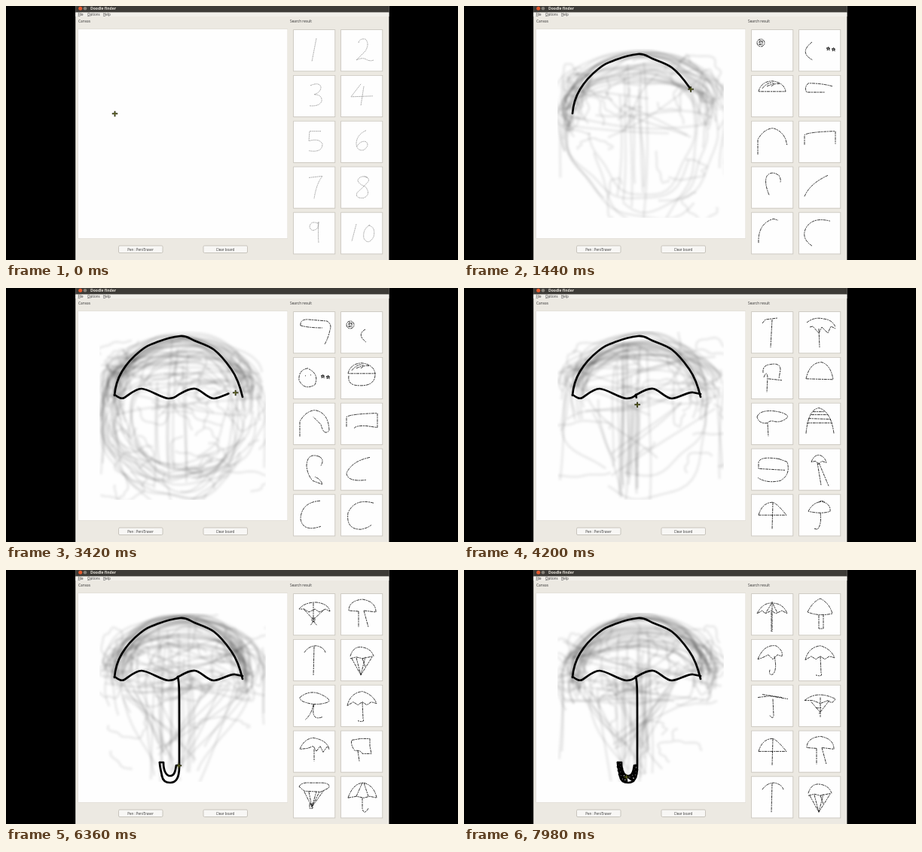
These frames come from a looping animation (600 by 338 pixels, 8000 ms). An HTML page with a canvas:

```html
<!DOCTYPE html>
<html lang="en">
<head>
<meta charset="utf-8">
<title>Doodle finder</title>
<style>
html, body { margin: 0; width: 600px; height: 338px; overflow: hidden; background: #000; }
canvas { display: block; }
svg { position: absolute; width: 0; height: 0; }
</style>
</head>
<body>
<canvas id="stage" width="600" height="338"></canvas>
<svg><path id="ruler"/></svg>
<script>
const LOOP = 8000, STEP = 60;
const ctx = stage.getContext('2d');

// Pen steps: path, start, end, ink, how far the ink trails the cursor (ms)
const steps = [
  ['M144 143C145 131 148 121 154 111S168 92 178 84S190 76 203 71S222 65 231 64S243 67 250 70S268 76 276 82S292 98 299 108S311 132 314 145', 60, 1680, 1, 10],
  ['M314 145L144 143', 1740, 1980, 0, 0],
  ['M144 142C150 146 153 148 157 146S171 134 180 134S207 147 216 147S227 143 229 142S243 133 251 134S267 147 276 147S296 138 304 139L314 141', 2020, 3500, 1, 75],
  ['M314 141L228 142', 3600, 4020, 0, 0],
  ['M228 142C230 150 230 160 230 190V262C230 277 225 283 218 283S208 280 207 274', 4136, 4936, 1, 45],
  ['M207 274C206 268 204 262 204 256', 4980, 5280, 1, 0],
  ['M204 256H209C209 266 212 274 218 274S225 266 226 260H229', 5460, 6180, 1, 0],
  ['M228 260L226 264 230 266 225 268 229 271 224 271 228 276 221 274 225 281 218 276', 6420, 6960, 1, 0],
  ['M218 276L205 257', 6960, 7080, 0, 0],
  ['M205 257L208 260 204 262 210 264 205 267 211 268 206 272 212 271 208 277 214 275 211 281 216 281 215 275', 7080, 7980, 1, 0]
].map(([d, from, to, ink, lag]) => {
  ruler.setAttribute('d', d);
  return { d, from, to, ink, lag, path: new Path2D(d), length: ruler.getTotalLength() };
});

// Thumbnail drawings, each in a 55 px square
const face = 'M7 17a5 5 0 1 0 10 0a5 5 0 1 0-10 0M9 16h2M12 15h2M9 19h5M11 13v8M14 14v6';
const stars = 'M36 24h5l-4 3 1.5-5 2 5zM43 25h5l-4 3 1.5-5 2 5z';
const bun = 'M9 21Q12 8 27 7Q43 9 45 21ZM14 17Q20 9 28 9M20 14L30 10M26 14Q32 9 37 11';
const tee = 'M23 23L10 22Q10 9 28 7Q46 10 46 24L30 22M23 23V44M30 22L36 44';
const cane = 'M14 17Q20 8 30 8Q40 10 42 17M27 9L26 48';
const chute = 'M12 22Q16 8 28 10Q40 12 43 22M12 25L20 23 28 25 42 22M14 25L26 47L41 23M20 24L26 47L32 23M28 25L32 36';
const brolly = 'M8 27Q12 10 28 8Q42 12 47 24L40 22 34 26 28 22 22 26 16 22ZM28 22L29 44Q32 50 22 47';
const tent = 'M9 27Q14 10 28 10Q34 12 46 27ZM28 10L27 46';

const digits = [
  'M30 11L24 42',
  'M23 17Q24 11 32 12Q38 18 32 28L20 40Q28 36 33 39T43 40',
  'M22 13Q34 8 36 15Q36 22 27 25Q38 25 37 34Q34 41 21 40',
  'M26 11L13 28L42 27M30 14L26 40',
  'M36 13L21 13L20 26Q34 22 38 30Q38 42 20 39',
  'M33 12Q20 18 20 30Q21 40 30 38Q38 32 33 27Q26 25 21 33',
  'M20 14L38 12Q30 22 27 42',
  'M35 14Q26 10 22 17Q22 22 32 26Q40 36 30 41Q18 42 21 34Q30 26 36 19Q38 14 30 12',
  'M32 14Q22 10 21 19Q24 27 32 20L33 12Q32 28 33 40',
  'M20 15L14 38M38 16Q28 22 30 34Q36 44 43 32Q46 18 36 17'
];
const arcs = [
  face,
  'M17 16Q-1 30 18 40' + stars,
  bun,
  'M44 14Q30 10 12 10Q6 16 10 22L34 22',
  'M8 44V24Q16 10 28 9Q40 12 45 24L47 32',
  'M7 31V18Q12 14 48 13V30',
  'M23 37Q16 20 20 12Q26 4 36 11Q39 16 38 20',
  'M7 39Q14 22 38 11',
  'M9 40Q8 14 29 8L35 10',
  'M17 44Q2 34 9 20Q18 5 41 11'
];
const bends = [
  'M9 18Q8 9 20 10L44 12Q51 16 48 24Q46 34 41 43M9 18Q20 21 38 21',
  face + 'M32 23Q20 30 33 40',
  'M19 14Q6 16 7 30Q14 44 28 36Q34 22 20 15M15 24h1M22 23h1' + stars,
  bun + 'M10 24Q8 37 24 37Q46 38 45 20',
  'M8 44V24Q16 10 28 9Q46 12 47 36Q40 44 36 28L26 18',
  'M7 31V18Q12 14 48 13V32L34 30Q20 29 17 33',
  'M34 10Q18 4 17 22Q18 34 25 42L38 47Q36 40 28 37M34 10Q41 14 36 22',
  'M38 11Q14 16 7 32Q8 44 33 41',
  'M35 8Q10 10 9 32Q12 50 36 42',
  'M43 11Q18 4 9 24Q6 46 26 46Q36 44 40 40'
];
const domes = [
  'M14 15L18 10L34 8M27 10L25 47',
  'M10 14Q20 6 32 9Q44 10 48 20M14 20L18 19 26 28 30 20 38 28 42 19 48 22M26 22L27 47',
  'M15 20Q14 10 24 9Q38 6 38 16L36 28M16 26Q20 16 21 26L20 46M22 28L40 30',
  'M9 28Q14 6 30 6Q42 10 45 29Z',
  'M7 18Q10 9 28 10Q46 12 48 18Q40 26 30 24Q24 22 21 26L22 44M21 26Q10 28 7 18',
  'M9 40Q12 8 26 6Q42 10 46 40M18 11H34M16 15H38M12 20L42 21M10 26H44',
  'M36 13Q10 9 9 18V26L44 28M36 13L47 17Q52 34 38 42Q20 46 8 38',
  'M16 17Q20 7 27 8Q34 10 36 18L30 16 26 20 22 16ZM24 18L29 48M26 18L39 49',
  tent,
  'M12 22Q18 10 30 9Q42 12 41 22Q30 26 12 22M26 10Q30 6 34 10M28 24Q30 40 24 46L20 45'
];
const sticks = [
  'M7 20Q14 11 30 11Q46 13 48 23L42 20 34 24 28 20 20 24 14 20ZM14 21L26 34L40 21M26 12V36L22 42M26 36L31 42M24 32h4v4h-4z',
  tee, cane, chute,
  'M8 16Q20 6 34 11Q50 18 46 22Q30 28 14 22Q8 20 8 16M26 25Q24 38 15 46M27 25Q22 48 38 42',
  brolly,
  'M8 24Q14 10 26 9Q44 12 47 24L44 21 39 28 35 20 30 27 26 20 18 23ZM27 24V40',
  'M14 12L26 10 38 10 38 20 40 30H28Q26 25 18 26Q12 18 14 12M22 26L24 40',
  'M18 14Q16 8 26 7Q34 8 32 18Q28 24 20 21ZM26 22V38M14 36Q26 26 40 34M26 38L20 46M26 38L28 50',
  'M16 17Q22 8 32 10L38 18L28 20M25 10L27 48'
];
const hooks = [
  ...sticks.slice(0, 8),
  'M7 13Q10 7 22 8H38Q50 9 46 15L36 20 14 19ZM14 20L24 40 40 18M20 20L24 40L30 20M24 40L34 20M21 36h4v6h-4z',
  'M9 28Q16 8 30 8Q44 12 47 28L38 26 30 28 20 26ZM28 8L20 26M30 8L36 26M28 28V42Q30 52 36 42'
];
const handles = [
  'M7 26Q14 12 26 12Q42 12 47 26L40 22 32 26 26 22 18 26 14 22ZM27 10V50M26 24V50M26 13L18 26M28 13L34 25',
  'M11 24Q18 10 28 6Q40 12 44 26Q26 30 11 24ZM26 28V46h6V28',
  'M8 26Q16 6 32 8Q42 14 40 22L34 20 28 26 22 20 14 24ZM30 22Q34 40 28 46Q22 48 24 40',
  brolly,
  'M8 16L24 14 48 18M14 12L40 16M28 18L29 40Q28 46 24 40',
  'M7 20Q24 6 48 18Q44 26 38 20L28 24 18 20ZM16 22L28 36M40 20L26 38M28 16V42M22 30h8',
  tent, tee, cane, chute
];

function random(seed) {
  return () => {
    seed = seed + 0x6D2B79F5 | 0;
    let n = Math.imul(seed ^ seed >>> 15, 1 | seed);
    n = n + Math.imul(n ^ n >>> 7, 61 | n) ^ n;
    return ((n ^ n >>> 14) >>> 0) / 4294967296;
  };
}

// Blurred overlay of many faint, shaky sketches
function ghost(seed, counts) {
  const layer = document.createElement('canvas');
  layer.width = 600;
  layer.height = 338;
  const g = layer.getContext('2d'), rnd = random(seed);
  const pick = (a, b) => a + (b - a) * rnd();
  const curve = (x1, y1, x2, y2, bend) => {
    const shake = () => pick(-bend, bend);
    g.moveTo(x1, y1);
    g.bezierCurveTo(x1 + (x2 - x1) / 3 + shake(), y1 + (y2 - y1) / 3 + shake(),
      x2 - (x2 - x1) / 3 + shake(), y2 - (y2 - y1) / 3 + shake(), x2, y2);
  };
  const loop = (x, y, rx, ry, from, to, wobble) => {
    const p = pick(0, 6), q = pick(0, 6);
    for (let a = from; a < to; a += .1) {
      const r = 1 + wobble * (Math.sin(3 * a + p) + .6 * Math.sin(7 * a + q));
      g.lineTo(x + rx * r * Math.cos(a), y + ry * r * Math.sin(a));
    }
  };
  const scrap = (top, bottom) => {
    const a = pick(0, 6);
    loop(pick(140, 330), pick(top, bottom), pick(8, 45), pick(8, 32), a, a + pick(1, 4.5), .12);
  };
  const kinds = {
    dome() {
      const top = 60 + 42 * rnd() ** 2, y = pick(118, 155), tail = pick(-.2, .5);
      loop(pick(226, 242), y, pick(74, 108), y - top, Math.PI - tail, Math.PI * 2 + pick(-.2, .5), .025);
    },
    ring() { const a = pick(0, 6); loop(pick(222, 246), pick(158, 186), pick(66, 108), pick(66, 108), a, a + pick(2, 5), .05); },
    stick() { const x = pick(198, 246); curve(x, pick(64, 160), x + pick(-6, 6), pick(235, 285), 7); },
    bar() { curve(pick(126, 220), pick(90, 175), pick(230, 344), pick(90, 175), 22); },
    fan() { curve(rnd() < .5 ? pick(132, 200) : pick(260, 338), pick(130, 170), pick(195, 265), pick(220, 285), 14); },
    side() { const x = rnd() < .6 ? 127 : 340; curve(x + pick(-2, 12), pick(100, 140), x + pick(-2, 6), pick(170, 260), 6); },
    knob() { loop(rnd() < .65 ? pick(136, 158) : pick(300, 335), pick(95, 150), pick(7, 18), pick(8, 24), 0, 6.3, .1); },
    scrap() { scrap(80, 265); },
    tuft() { scrap(80, 168); }
  };
  g.beginPath();
  g.rect(124, 57, 221, 225);
  g.clip();
  g.strokeStyle = 'rgba(0,0,0,.07)';
  g.lineWidth = 3.4;
  for (const kind in counts)
    for (let i = 0; i < counts[kind]; i++) {
      g.beginPath();
      kinds[kind]();
      g.stroke();
    }
  g.globalCompositeOperation = 'copy';
  g.filter = 'blur(1.4px)';
  g.drawImage(layer, 0, 0);
  return layer;
}

const scenes = [
  [0, digits],
  [480, arcs, ghost(4, { dome: 18, ring: 9, stick: 7, bar: 10, side: 6, knob: 11, scrap: 10, tuft: 8 })],
  [2220, bends, ghost(11, { dome: 18, ring: 26, stick: 7, bar: 14, side: 6, knob: 12, scrap: 32, tuft: 10 })],
  [3660, domes, ghost(23, { dome: 24, ring: 4, stick: 17, bar: 14, fan: 6, side: 4, knob: 4, scrap: 8, tuft: 10 })],
  [4800, sticks, ghost(31, { dome: 32, stick: 12, bar: 18, fan: 18, side: 2, knob: 10, scrap: 8, tuft: 28 })],
  [6300, hooks, ghost(37, { dome: 32, stick: 13, bar: 18, fan: 19, side: 2, knob: 10, scrap: 8, tuft: 28 })],
  [7020, handles, ghost(43, { dome: 32, stick: 17, bar: 22, fan: 15, side: 2, knob: 8, scrap: 10, tuft: 24 })]
].map(([at, thumbs, shade]) => ({ at, shade, thumbs: thumbs.map(d => new Path2D(d)) }));

function rect(x, y, w, h, fill) {
  ctx.fillStyle = fill;
  ctx.fillRect(x, y, w, h);
}

function disc(x, y, r, fill) {
  ctx.fillStyle = fill;
  ctx.beginPath();
  ctx.arc(x, y, r, 0, 7);
  ctx.fill();
}

function text(s, x, y, size, fill = '#333', weight = 400) {
  ctx.font = `${weight} ${size}px "Open Sans", sans-serif`;
  ctx.fillStyle = fill;
  ctx.fillText(s, x, y);
}

function button(x, label) {
  ctx.beginPath();
  ctx.roundRect(x + .5, 319, 58.5, 9.5, 1.5);
  ctx.fillStyle = '#f8f7f5';
  ctx.fill();
  ctx.strokeStyle = '#bdb9b0';
  ctx.lineWidth = .8;
  ctx.stroke();
  ctx.textAlign = 'center';
  text(label, x + 29.5, 325.5, 4.5);
  ctx.textAlign = 'left';
}

function drawWindow() {
  rect(0, 0, 600, 338, '#000');
  rect(92.2, 0, 416.2, 338, '#ece9e2');
  rect(92.2, 0, 416.2, 8.6, '#3d3b37');
  disc(98.7, 3.2, 2.5, '#e4592d');
  disc(105, 3.2, 2.3, '#85827a');
  text('Doodle finder', 112, 5.2, 5, '#e4e0d8', 700);
  rect(92.2, 8.6, 416.2, 5.4, '#f1efea');
  [['File', 95.5], ['Options', 108], ['Help', 129]].forEach(([s, x]) => {
    text(s, x, 12.7, 4.5);
    rect(x, 13.2, 3, .5, '#555');
  });
  text('Canvas', 96, 21.8, 4.8);
  text('Search result', 377, 21.8, 4.8);
  rect(95.5, 30.5, 278.5, 279, '#dedad3');
  rect(96, 31, 277.5, 278, '#fefefe');
  button(149, 'Pen : Pen/Eraser');
  button(261.5, 'Clear board');
}

function drawThumbs(thumbs) {
  const thin = thumbs === scenes[0].thumbs;
  thumbs.forEach((path, i) => {
    const x = 382 + 63 * (i % 2), y = 32 + 60.8 * (i >> 1);
    rect(x - .8, y - .8, 56, 56, '#c9c5bd');
    rect(x, y, 54.3, 54.3, '#fefefe');
    ctx.save();
    ctx.translate(x, y);
    ctx.strokeStyle = thin ? '#777' : '#111';
    ctx.lineWidth = thin ? .6 : .85;
    ctx.setLineDash(thin ? [2, .6] : [4, .8, 2, 1]);
    ctx.stroke(path);
    ctx.restore();
  });
}

function drawInk(t) {
  ctx.strokeStyle = '#000';
  ctx.lineWidth = 2.7;
  ctx.lineCap = ctx.lineJoin = 'round';
  for (const s of steps) {
    const part = Math.min(1, (t - s.lag - s.from) / (s.to - s.from));
    if (!s.ink || part <= 0) continue;
    ctx.setLineDash(part < 1 ? [s.length * part, 999] : []);
    ctx.stroke(s.path);
  }
  ctx.setLineDash([]);
  ctx.lineCap = 'butt';
}

function drawCursor(t) {
  const s = steps.findLast(s => s.from <= t) || steps[0];
  const part = Math.max(0, Math.min(1, (t - s.from) / (s.to - s.from)));
  ruler.setAttribute('d', s.d);
  const { x, y } = ruler.getPointAtLength(s.length * part);
  rect(x - 3.2, y - .6, 7.4, 1.8, '#1c1d08');
  rect(x - .4, y - 3.2, 1.8, 7.4, '#1c1d08');
  rect(x - 2.4, y, 5.8, .6, '#7c8428');
  rect(x + .2, y - 2.4, .6, 5.8, '#7c8428');
}

function frame() {
  const t = Math.floor(performance.now() % LOOP / STEP) * STEP;
  const scene = scenes.findLast(s => s.at <= t);
  drawWindow();
  drawThumbs(scene.thumbs);
  if (scene.shade) ctx.drawImage(scene.shade, 0, 0);
  drawInk(t);
  drawCursor(t);
  requestAnimationFrame(frame);
}
frame();
</script>
</body>
</html>
```
